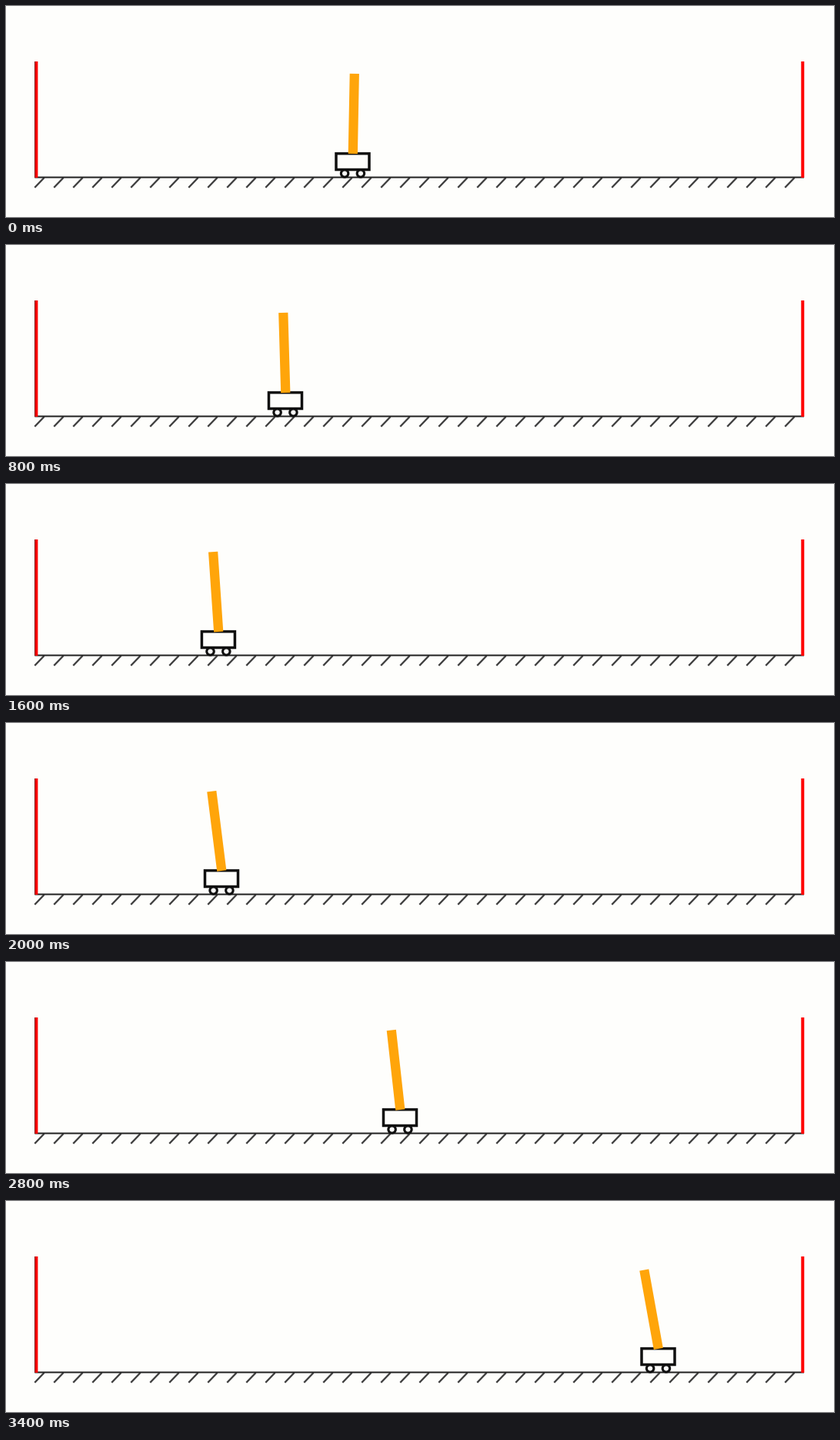
Recreate the animation shown at these times as a matplotlib script. Size 1076 by 274 pixels, loop 3600 ms.

```python
import numpy as np
import matplotlib.pyplot as plt
from matplotlib.animation import FuncAnimation
from matplotlib.patches import Circle, Rectangle

WIDTH, HEIGHT, DPI = 1076, 274, 100
FRAMES, INTERVAL = 18, 200
PAPER, INK = "#fefefc", "#101010"
LEFT, RIGHT, GROUND = 37.3, 1037, 222.5
HATCH_STEP = 25
PIVOT_Y, POLE_LENGTH = 191.9, 104
WHEEL_Y, WHEEL_GAP = 217.4, 10.4

# Key poses: (step, cart centre, sideways lean of the pole's tip).
KEY_POSES = np.array([
    (0, 450.5, 2),
    (3, 399.5, -2),
    (4, 363, -3),
    (6, 313, -3),
    (10, 280, -13),
    (12, 353.5, -18.5),
    (14, 512, -11.5),
    (17, 847.5, -18.5),
])
KEY_STEPS, POSES = KEY_POSES[:, 0], KEY_POSES[:, 1:]
SLOPES = np.gradient(POSES, KEY_STEPS, axis=0)


def pose_at(step):
    """Smooth cubic path through the key poses."""
    i = min(np.searchsorted(KEY_STEPS, step, "right"), len(KEY_STEPS) - 1) - 1
    span = KEY_STEPS[i + 1] - KEY_STEPS[i]
    u = (step - KEY_STEPS[i]) / span
    ease = u * u * (3 - 2 * u)
    return (POSES[i] * (1 - ease) + POSES[i + 1] * ease
            + span * u * (1 - u) * (SLOPES[i] * (1 - u) - SLOPES[i + 1] * u))


def px(width):
    """Line width in pixels to points."""
    return width * 72 / DPI


fig = plt.figure(figsize=(WIDTH / DPI, HEIGHT / DPI), dpi=DPI, facecolor=PAPER)
ax = fig.add_axes([0, 0, 1, 1])
ax.set_xlim(0, WIDTH)
ax.set_ylim(HEIGHT, 0)
ax.axis("off")


def stroke(xs, ys, color, width, zorder):
    line, = ax.plot(xs, ys, color=color, lw=px(width), zorder=zorder,
                    solid_capstyle="butt", snap=False)
    return line


for x in np.arange(LEFT, RIGHT - HATCH_STEP / 2, HATCH_STEP):
    stroke([x, x + 12.3], [235.8, 223], "#404040", 2.3, 1)
stroke([LEFT, RIGHT], [GROUND, GROUND], "#202020", 2, 2)
for x in (39.4, 1035.3):
    stroke([x, x], [72, GROUND + 0.5], "#ff0000", 4, 3)
stroke([37.6, 37.6], [72, GROUND + 0.5], "#801010", 1.1, 4)

wheels = [ax.add_patch(Circle((0, WHEEL_Y), 4.7, fc=PAPER, ec=INK, lw=px(3.1),
                              zorder=4, snap=False)) for _ in range(2)]
body = ax.add_patch(Rectangle((0, 191.6), 43, 20.9, fc=PAPER, ec=INK,
                              lw=px(3.5), zorder=5, snap=False,
                              joinstyle="miter"))
pole = stroke([0, 0], [0, 0], "#ffa50a", 12.2, 6)


def update(frame):
    x, lean = pose_at(frame)
    body.set_x(x - 21.5)
    for wheel, side in zip(wheels, (-1, 1)):
        wheel.center = (x + side * WHEEL_GAP, WHEEL_Y)
    pole.set_data([x + 0.3, x + 0.3 + lean],
                  [PIVOT_Y, PIVOT_Y - np.sqrt(POLE_LENGTH ** 2 - lean ** 2)])
    return [body, pole, *wheels]


anim = FuncAnimation(fig, update, frames=FRAMES, interval=INTERVAL,
                     repeat=True, repeat_delay=0)
plt.show()
```
